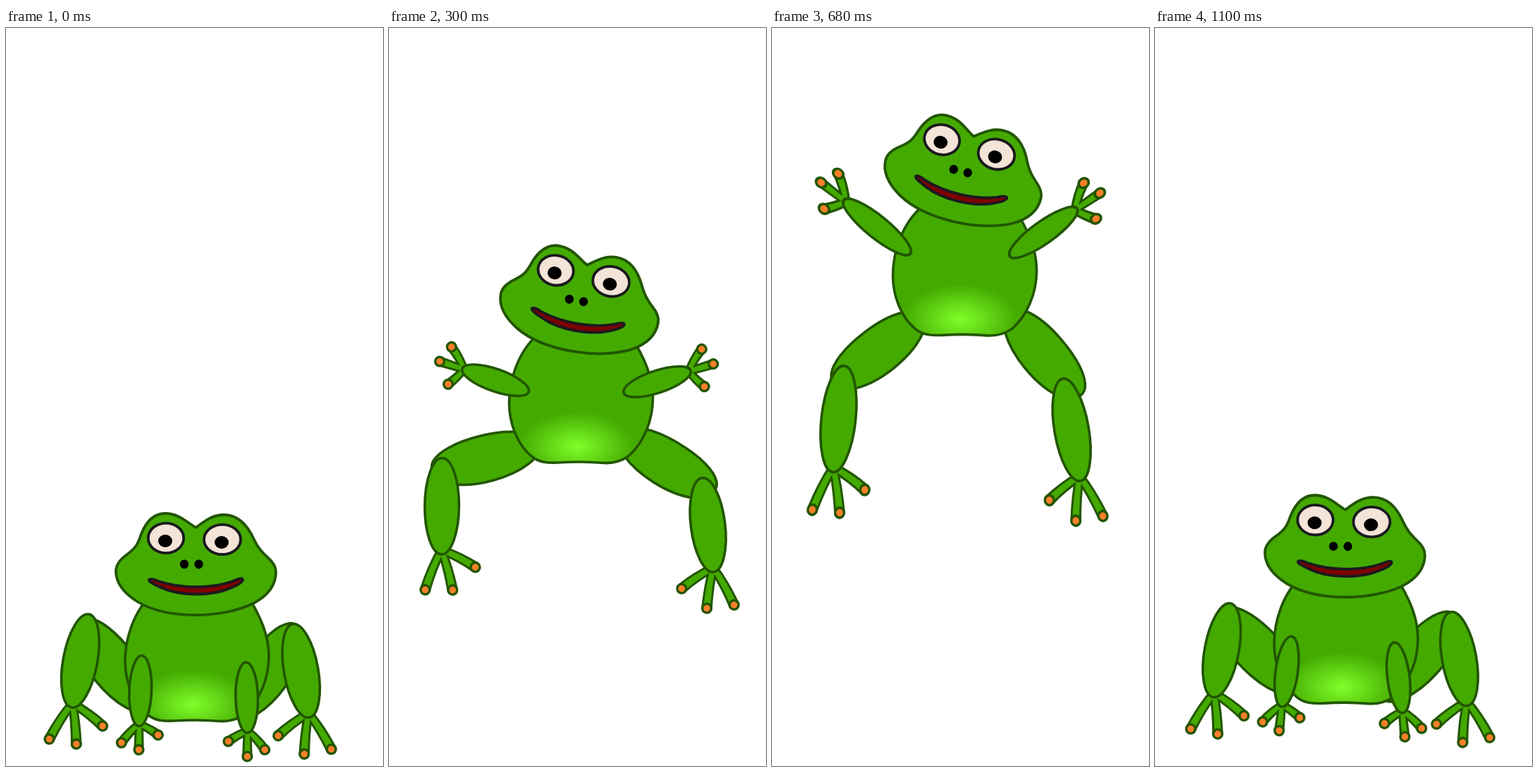
Write an HTML page with a canvas that moves like this. It is 535 px wide and 1046 px high and loops after 1.12 s.

```html
<!DOCTYPE html>
<html lang="en">
<head>
<meta charset="utf-8">
<title>Jumping frog</title>
<style>
  html, body { margin: 0; width: 100%; height: 100%; overflow: hidden; background: #fff; }
  canvas { display: block; }
</style>
</head>
<body>
<canvas id="stage" width="535" height="1046"></canvas>
<script>
const ctx = document.getElementById('stage').getContext('2d');
const LOOP = 1120, STEP = 20, TAU = Math.PI * 2;
const GREEN = '#44aa00', EDGE = '#225500', INK = '#1a1a1f', TIP = '#ff7f2a';
const rad = d => d * Math.PI / 180;

// Values at 0, 400, 600 and optionally 820 ms, back to the first at the loop end.
function track(t, v) {
  const times = v.length > 3 ? [0, 400, 600, 820, LOOP] : [0, 400, 600, LOOP];
  let i = 0;
  while (t >= times[i + 1]) i++;
  const a = v[i], b = v[(i + 1) % v.length];
  return a + (b - a) * (t - times[i]) / (times[i + 1] - times[i]);
}

const bodyPath = new Path2D(`M210 800 C180 826 169 868 169 897
  C169 925 180 957 202 974 C212 982 224 982.5 238 982
  C262 980.5 282 980.5 303 982.5 C318 983.5 328 980 338 973
  C360 954 373 922 373 890 C373 862 362 834 340 800 Z`);
const headPath = new Path2D(`M269.5 708 C258 702 246 688 226 688
  C208 688 198 702 192 717 C187 732 184 737 172 746
  C162 753 156 760 156 770 C156 786 165 800 188 814
  C212 828 242 832 270 832 C302 832 332 825 352 815
  C374 803 383 788 383 771 C383 762 378 756 371 750
  C362 742 357 736 352 725 C343 705 330 690 309 690
  C294 690 284 697 269.5 708 Z`);
const mouthPath = new Path2D(`M203 782 C206 780 212 782 216 784
  C250 795 292 795 322 784 C330 780 336 779 336 782
  C336 786 328 790 318 794 C290 806 246 805 220 793
  C211 789 202 785 203 782 Z`);
// Hip at the left, blunt knee at the right.
const thighPath = new Path2D(`M-78 0 C-78 -16 -48 -32 0 -33
  C38 -34 64 -27 75 -16 C84 -6 79 8 66 18
  C46 29 22 32.5 0 32.5 C-44 32.5 -78 18 -78 0 Z`);

const foot = { root: [0, 116], tips: [[-23, 172], [16, 172], [48, 140]], w0: 3.4, w1: 4.8 };
const hand = { root: [0, 80], tips: [[-24, 107.5], [1, 116.5], [27.5, 94.5]], w0: 2.8, w1: 4.2 };

const sides = [
  {
    dir: -1,
    thigh: { x: 200, y: [945.5, 945.5, 945.5], reach: [62, 72, 79], skew: -10.5, angle: [51, -37.5, -39, -38] },
    knee: { x: 200, y: 945.5, reach: [133, 133, 139], angle: [50.5, -41.6, -43.1, -42.1] },
    shin: { lean: [10.5, -3, 3.8, 10.5], stretch: [1, 1.02, 1.15] },
    arm: { x: [192, 177, 175], y: [906.5, 866, 844], angle: [2.2, 145, 152], stretch: [1, 1, 1.25] }
  },
  {
    dir: 1,
    thigh: { x: 345, y: [958, 960, 972, 972], reach: [51, 52, 52], skew: 6, angle: [54, -61, -54.5, -44] },
    knee: { x: 356, y: 952, reach: [109, 109, 121], angle: [60.8, -68, -65, -56] },
    shin: { lean: [10, 6, 8.5, 12], stretch: [1, 1, 1.11] },
    arm: { x: [341, 350, 353, 348], y: [916, 865, 854, 867], angle: [1.2, 144, 148], stretch: [1, 1, 1.2] }
  }
];

function paint(path, fill, stroke, width) {
  ctx.fillStyle = fill;
  ctx.fill(path);
  if (!stroke) return;
  ctx.strokeStyle = stroke;
  ctx.lineWidth = width;
  ctx.stroke(path);
}

function oval(x, y, rx, ry, fill, stroke, width) {
  const p = new Path2D();
  p.ellipse(x, y, rx, ry, 0, 0, TAU);
  paint(p, fill, stroke, width);
}

// Toes widen and bend slightly outwards from a shared root.
function drawPaw({ root: [x, y], tips, w0, w1 }) {
  const p = new Path2D();
  for (const [tx, ty] of tips) {
    const dx = tx - x, dy = ty - y, len = Math.hypot(dx, dy);
    const nx = -dy / len, ny = dx / len, w = (w0 + w1) / 2;
    const cx = x + dx * 0.57, cy = y + dy * 0.43;
    p.moveTo(x + nx * w0, y + ny * w0);
    p.quadraticCurveTo(cx + nx * w, cy + ny * w, tx + nx * w1, ty + ny * w1);
    p.lineTo(tx - nx * w1, ty - ny * w1);
    p.quadraticCurveTo(cx - nx * w, cy - ny * w, x - nx * w0, y - ny * w0);
    p.closePath();
  }
  ctx.strokeStyle = EDGE;
  ctx.lineWidth = 6;
  ctx.stroke(p);
  ctx.fillStyle = GREEN;
  ctx.fill(p);
  for (const [tx, ty] of tips) oval(tx, ty, 6.4, 6.4, TIP, EDGE, 3.4);
}

function drawThigh(t, { dir, thigh: h }) {
  const a = track(t, h.angle), r = track(t, h.reach), c = rad(a + h.skew);
  ctx.save();
  ctx.translate(h.x + dir * r * Math.cos(c), track(t, h.y) - r * Math.sin(c));
  ctx.scale(dir, 1);
  ctx.rotate(-rad(a));
  paint(thighPath, GREEN, EDGE, 3.6);
  ctx.restore();
}

// A lower limb hangs down from its joint, with the paw tucked under it.
function drawLimb(x, y, dir, angle, stretch, paw, mid, rx, ry) {
  ctx.save();
  ctx.translate(x, y);
  ctx.rotate(-dir * rad(angle));
  ctx.scale(-dir, stretch);
  drawPaw(paw);
  oval(0, mid, rx, ry, GREEN, EDGE, 3.6);
  ctx.restore();
}

function drawArm(t, { dir, arm: m }) {
  drawLimb(track(t, m.x), track(t, m.y), dir, track(t, m.angle), track(t, m.stretch), hand, 33, 15.8, 50);
}

function drawShin(t, { dir, knee, shin }) {
  const a = rad(track(t, knee.angle)), r = track(t, knee.reach);
  drawLimb(knee.x + dir * r * Math.cos(a), knee.y - r * Math.sin(a), dir,
    track(t, shin.lean), track(t, shin.stretch), foot, 55, 24.3, 67.2);
}

function drawBody() {
  paint(bodyPath, GREEN);
  ctx.save();
  ctx.clip(bodyPath);
  ctx.translate(265, 959);
  ctx.scale(1, 0.6);
  const glow = ctx.createRadialGradient(0, 0, 0, 0, 0, 82);
  glow.addColorStop(0, '#80ff2a');
  glow.addColorStop(1, GREEN);
  ctx.fillStyle = glow;
  ctx.fillRect(-82, -82, 164, 164);
  ctx.restore();
  ctx.strokeStyle = EDGE;
  ctx.lineWidth = 3.6;
  ctx.stroke(bodyPath);
}

function drawHead(t) {
  ctx.save();
  ctx.translate(309, 763);
  ctx.rotate(rad(track(t, [0, 13.3, 16])));
  ctx.translate(-309, -763);
  paint(headPath, GREEN, EDGE, 3.8);
  oval(227, 723, 25.2, 21.2, '#f4e3d7', INK, 3.8);
  oval(307, 725, 26, 21.2, '#f4e3d7', INK, 3.8);
  oval(226, 727, 10, 9, '#000');
  oval(306, 729, 10, 9, '#000');
  oval(253, 760, 6.2, 6.4, '#000');
  oval(273.5, 760, 6.2, 6.4, '#000');
  paint(mouthPath, '#800000', INK, 3.8);
  ctx.restore();
}

function draw(t) {
  ctx.fillStyle = '#fff';
  ctx.fillRect(0, 0, 535, 1046);
  ctx.save();
  ctx.lineJoin = 'round';
  ctx.translate(track(t, [0, 2, 3]), track(t, [0, -488, -646]));
  for (const s of sides) drawThigh(t, s);
  drawBody();
  drawHead(t);
  for (const s of sides) drawArm(t, s);
  for (const s of sides) drawShin(t, s);
  ctx.restore();
}

const start = performance.now();
function tick() {
  const t = (performance.now() - start) % LOOP;
  draw(Math.floor(t / STEP) * STEP);
  requestAnimationFrame(tick);
}
tick();
</script>
</body>
</html>
```
